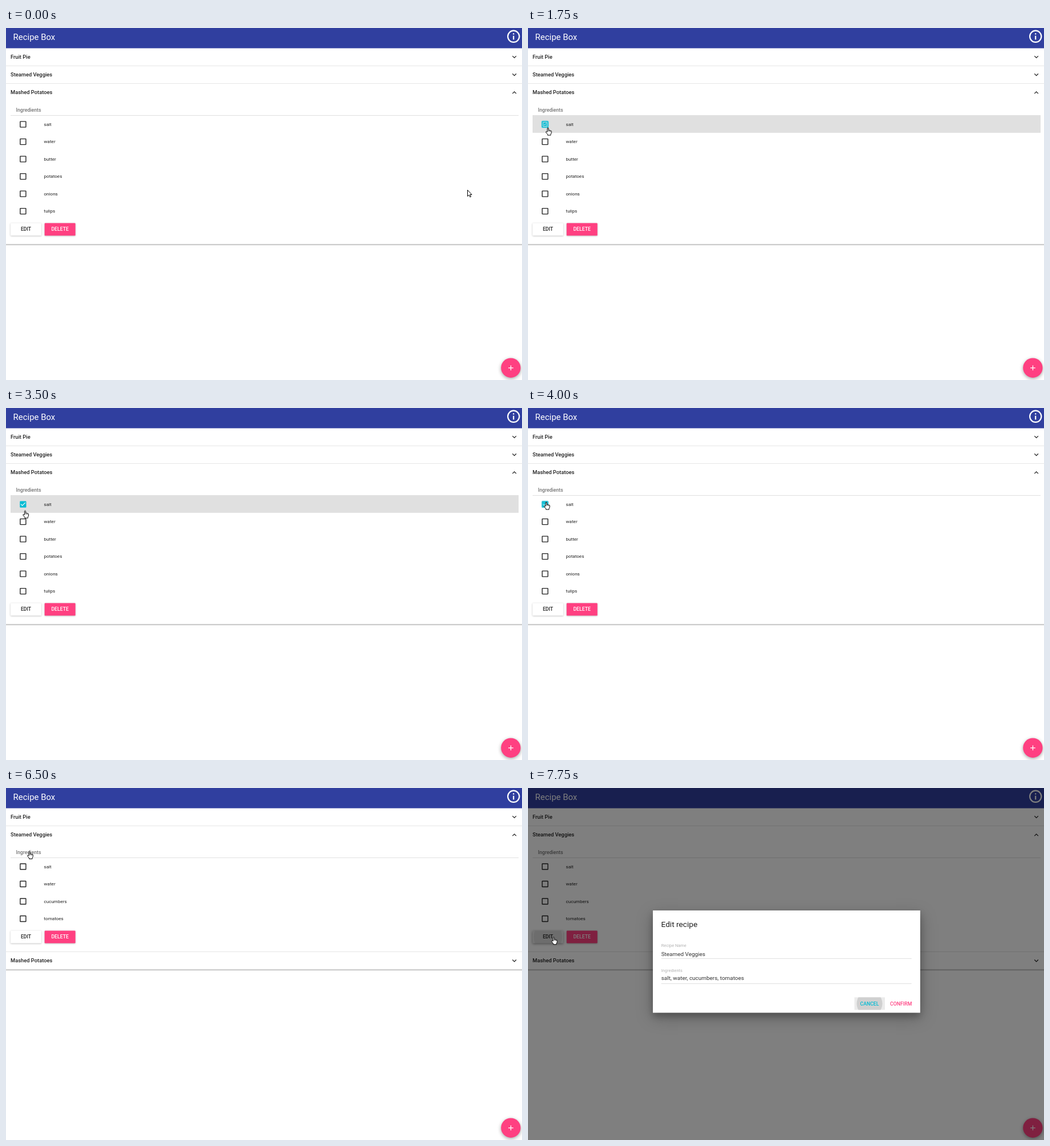
Animation, 905 px wide and 618 px high, one loop 8000 ms. Source, as an HTML page with a canvas:

```html
<!DOCTYPE html>
<html lang="en">
<head>
<meta charset="utf-8">
<title>Recipe list</title>
<style>
  html, body { margin: 0; width: 100%; height: 100%; overflow: hidden; background: #fff; }
  canvas { display: block; width: 905px; height: 618px; }
</style>
</head>
<body>
<canvas id="stage" width="905" height="618"></canvas>
<script>
const W = 905, H = 618, LOOP = 8000, STEP = 250;
const U = 0.6224; // page zoom
const INK = 'rgba(0,0,0,.87)', PINK = '#ff4081', TEAL = '#00bcd4';
const ctx = document.getElementById('stage').getContext('2d');

const DOWN = new Path2D('M7.41 7.84L12 12.42l4.59-4.58L18 9.25l-6 6-6-6z');
const UP = new Path2D('M7.41 15.41L12 10.83l4.59 4.58L18 14l-6-6-6 6z');
const CHECKED = new Path2D('M19 3H5c-1.11 0-2 .9-2 2v14c0 1.1.89 2 2 2h14c1.11 0 2-.9 2-2V5c0-1.1-.89-2-2-2zm-9 14l-5-5 1.41-1.41L10 14.17l7.59-7.59L19 8l-9 9z');
const TICK = new Path2D('M10 17l-5-5 1.41-1.41L10 14.17l7.59-7.59L19 8z');
const ARROW = new Path2D('M0 0V11L2.6 8.7 4.4 12.4 6 11.7 4.4 8H7.5Z');
const HAND = new Path2D('M-1 8V1.4Q0 -.2 1 1.4V5Q2.2 4.2 2.8 5.4 4 4.7 4.5 5.8 6 5.4 6.1 7V9.5L4.9 12V13.7H-.6V12.2L-3.6 8.6Q-3.8 7 -2.4 7.2Z');

const RECIPES = [
  { name: 'Fruit Pie', items: [] },
  { name: 'Steamed Veggies', items: ['salt', 'water', 'cucumbers', 'tomatoes'] },
  { name: 'Mashed Potatoes', items: ['salt', 'water', 'butter', 'potatoes', 'onions', 'tulips'] }
];

// Pointer tip: time, x, y
const PATH = [
  [0, 809.5, 284.5], [1250, 39.5, 164.5], [1500, 35, 174.5], [2000, 35, 174.5],
  [2500, 35, 194.5], [3250, 35, 194.5], [3750, 32, 164.5], [4250, 32, 164.5],
  [5000, 39, 109.5], [5250, 39, 109.5], [5750, 40.5, 83], [6250, 40.5, 83],
  [7250, 45, 261], [8000, 45, 261]
];

// Ticked rows of the last recipe: switch-on and switch-off times
const TICKS = [{ on: 1510, off: 3900 }, { on: 2250, off: 3150 }];

const clamp = v => Math.max(0, Math.min(1, v));
const ease = p => p * p * (3 - 2 * p);

function text(str, x, y, size, color = INK, weight = 400, align = 'left') {
  ctx.font = `${weight} ${size * U}px Roboto, sans-serif`;
  ctx.textAlign = align;
  ctx.fillStyle = color;
  ctx.fillText(str, x, y);
}

function rect(x, y, w, h, color) {
  ctx.fillStyle = color;
  ctx.fillRect(x, y, w, h);
}

function disc(x, y, r, color) {
  ctx.fillStyle = color;
  ctx.beginPath();
  ctx.arc(x, y, r, 0, Math.PI * 2);
  ctx.fill();
}

function shadow(alpha, dy, blur) {
  ctx.shadowColor = `rgba(0,0,0,${alpha})`;
  ctx.shadowOffsetY = dy;
  ctx.shadowBlur = blur;
}

function icon(path, cx, cy, scale, color) {
  ctx.save();
  ctx.translate(cx, cy);
  ctx.scale(scale, scale);
  ctx.translate(-12, -12);
  ctx.fillStyle = color;
  ctx.fill(path);
  ctx.restore();
}

function clipped(x, y, w, h, draw) {
  ctx.save();
  ctx.beginPath();
  ctx.rect(x, y, w, h);
  ctx.clip();
  draw();
  ctx.restore();
}

function button(label, x, cy, fill, color, lift) {
  ctx.save();
  shadow(lift ? 0.4 : 0.27, lift ? 1.2 : 0.7, lift ? 4 : 3);
  ctx.fillStyle = fill;
  ctx.beginPath();
  ctx.roundRect(x, cy - 10.7, 54, 22, 1.2);
  ctx.fill();
  ctx.restore();
  text(label, x + 27, cy + 3.1, 14, color, 500, 'center');
}

function outline(cx, cy, color) {
  ctx.strokeStyle = color;
  ctx.lineWidth = 1.4;
  ctx.beginPath();
  ctx.roundRect(cx - 5, cy - 5, 10, 10, 0.5);
  ctx.stroke();
}

function checkbox(cx, cy, tick, t) {
  if (!tick || t < tick.on) return outline(cx, cy, INK);
  const grow = clamp((t - tick.on) / 450), fade = 1 - clamp((t - tick.off) / 350);
  if (t < tick.off) {
    if (grow < 1) {
      ctx.save();
      ctx.shadowColor = TEAL;
      ctx.shadowBlur = 2;
      outline(cx, cy, TEAL);
      ctx.restore();
    }
    icon(TICK, cx, cy, U * grow, '#fff');
    icon(CHECKED, cx, cy, U * grow, TEAL);
    return;
  }
  ctx.save();
  ctx.globalAlpha = 1 - fade;
  outline(cx, cy, INK);
  ctx.globalAlpha = fade;
  icon(TICK, cx, cy, U, '#fff');
  ctx.shadowColor = TEAL;
  ctx.shadowBlur = 2;
  icon(CHECKED, cx, cy, U, TEAL);
  ctx.restore();
}

function details(recipe, y, t) {
  const ticks = recipe === RECIPES[2] ? TICKS : [];
  const first = y + 56.3;
  text('Ingredients', 17.5, y + 34.4, 14, 'rgba(0,0,0,.54)', 500);
  rect(8, Math.round(y + 40.2), 891, 1, '#e0e0e0');

  recipe.items.forEach((item, i) => {
    const cy = first + i * 30.5, tick = ticks[i];
    if (tick && t >= tick.on && t < tick.off) {
      rect(8, Math.round(cy - 16), 891, 31, '#e0e0e0');
    }
    const pressed = ticks.length && (i === 1 && t === 2500 || i === 0 && t === 3750);
    if (pressed) disc(30, cy, 9.5, 'rgba(0,0,0,.13)');
    checkbox(29.9, cy, tick, t);
    text(item, 66.5, cy + 2.6, 13);
  });

  const cy = first + recipe.items.length * 30.5 + 1.2;
  const pressed = t >= 7500;
  button('EDIT', 8, cy, pressed ? '#e9e9e9' : '#fff', INK, pressed);
  if (pressed) {
    clipped(8, cy - 10.7, 54, 22, () => {
      if (t < 7750) disc(42, cy, 9.5, 'rgba(0,0,0,.14)');
      else disc(35, cy, 25, 'rgba(0,0,0,.06)');
    });
  }
  button('DELETE', 67.7, cy, PINK, '#fff');
  return cy + 26.2;
}

function list(t) {
  const open = t < 5250 ? 2 : t >= 6250 ? 1 : -1;
  let top = 35;
  RECIPES.forEach((recipe, i) => {
    const y = top + 15.6;
    let end = top + 31.1;
    if (i) rect(0, Math.round(top - 0.5), W, 1, '#e6e6e6');
    text(recipe.name, 8, y + 3.1, 15, INK, 500);
    icon(i === open ? UP : DOWN, 891.6, y + 0.7, U, INK);
    if (i === open) end = details(recipe, y, t);
    top = end;
  });
  const edge = Math.round(top - 0.4);
  ['#d8d8d8', '#c4c4c4', '#ececec'].forEach((c, i) => rect(0, edge + i - (open < 0 ? 1 : 0), W, 1, c));
}

function header() {
  rect(0, 0, W, 35, '#303f9f');
  rect(0, 35, W, 1, '#8f97cb');
  text('Recipe Box', 12.6, 21, 24, '#fff');
  ctx.strokeStyle = '#fff';
  ctx.lineWidth = 2.2;
  ctx.beginPath();
  ctx.arc(890.2, 14.8, 10.1, 0, Math.PI * 2);
  ctx.stroke();
  rect(889.1, 9.2, 2.2, 2.2, '#fff');
  rect(889.1, 13.7, 2.2, 6.7, '#fff');
}

function addButton() {
  ctx.save();
  shadow(0.36, 1.9, 6);
  disc(885.4, 596.7, 17.2, PINK);
  ctx.restore();
  rect(881.1, 596.1, 8.7, 1.3, '#fff');
  rect(884.8, 592.4, 1.3, 8.7, '#fff');
}

function field(label, value, y) {
  text(label, 233.7, y, 12, 'rgba(0,0,0,.3)');
  text(value, 233.7, y + (label === 'Ingredients' ? 14.4 : 16.4), 16, 'rgba(0,0,0,.8)');
  rect(233.7, Math.round(y + 20.6), 439, 1, '#e0e0e0');
}

function dialog() {
  rect(0, 0, W, H, 'rgba(0,0,0,.5)');
  ctx.save();
  shadow(0.25, 8.7, 28);
  rect(219, 215, 468.7, 179.4, '#fff');
  shadow(0.22, 6.2, 11);
  rect(219, 215, 468.7, 179.4, '#fff');
  ctx.restore();
  text('Edit recipe', 233.5, 243.9, 22);
  field('Recipe Name', 'Steamed Veggies', 278.7);
  field('Ingredients', 'salt, water, cucumbers, tomatoes', 322.7);
  rect(572.5, 367.5, 53.5, 22, '#ebebeb');
  clipped(572.5, 367.5, 53.5, 22, () => disc(599, 378.5, 22.5, '#d0d0d0'));
  text('CANCEL', 599, 381.7, 14, TEAL, 500, 'center');
  text('CONFIRM', 654.2, 381.7, 14, PINK, 500, 'center');
}

function pointer(t) {
  const i = PATH.findIndex((key, n) => n && t < key[0]);
  const [t0, x0, y0] = PATH[i - 1], [t1, x1, y1] = PATH[i];
  const p = ease((t - t0) / (t1 - t0));
  const shape = t < 1250 ? ARROW : HAND;
  ctx.save();
  ctx.translate(x0 + (x1 - x0) * p, y0 + (y1 - y0) * p);
  ctx.fillStyle = '#fff';
  ctx.strokeStyle = '#000';
  ctx.lineWidth = 1;
  ctx.lineJoin = 'round';
  ctx.fill(shape);
  ctx.stroke(shape);
  if (shape === HAND) {
    ctx.lineWidth = 0.6;
    ctx.stroke(new Path2D('M1 5V7.4M2.8 5.4V7.6M4.5 5.8V7.8'));
  }
  ctx.restore();
}

function draw(now) {
  const t = Math.floor((now % LOOP) / STEP) * STEP;
  rect(0, 0, W, H, '#fff');
  list(t);
  header();
  addButton();
  if (t >= 7750) dialog();
  pointer(t);
}

let start;
function frame(now) {
  start ??= now;
  draw(now - start);
  requestAnimationFrame(frame);
}
draw(0);
requestAnimationFrame(frame);
</script>
</body>
</html>
```
